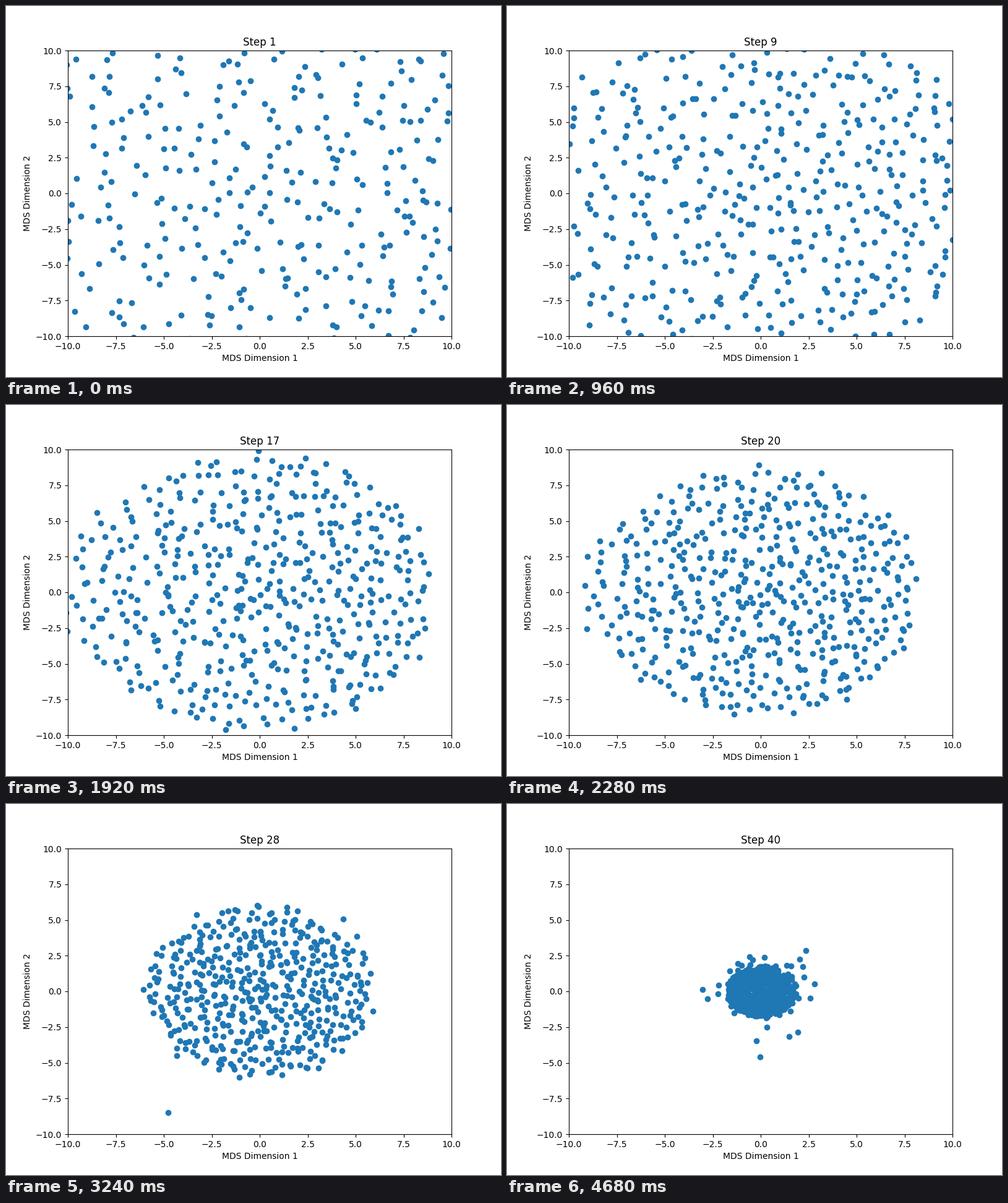
Recreate the animation shown at these times as a matplotlib script. Size 800x600 px, loop 4.8 s.

```python
import numpy as np
import matplotlib.pyplot as plt
from matplotlib.animation import FuncAnimation

STEPS, N = 40, 500
rng = np.random.default_rng(7)

# Evenly spread disk: golden-angle spiral plus jitter
radius = ((np.arange(N) + 0.5) / N) ** 0.54
angle = np.arange(N) * np.pi * (3 - np.sqrt(5))
outward = np.column_stack([np.cos(angle), np.sin(angle)])
disk = radius[:, None] * outward + rng.normal(0, 0.022, (N, 2))

# Slow drift of each dot, and a few dots that trail outside the shrinking disk
speed = rng.uniform(0.1, 0.35, (N, 2))
phase = rng.uniform(0, 2 * np.pi, (N, 2))
spill = np.minimum(0.02 * rng.exponential(1, N) ** 3, 2)


def stray(i):
    """The dot that lags far behind the rest."""
    r = np.interp(i, [0, 23, 31, 39], [22, 11, 8.5, 4.6])
    a = np.radians(np.interp(i, [23, 31, 39], [215.6, 265.6, 269.6]))
    return r * np.cos(a), r * np.sin(a)


def cloud(i):
    unit = disk + 0.022 * np.sin(speed * i + phase)
    unit += rng.normal(0, 0.008, (N, 2))
    # Denser towards the right until the cloud gets small
    skew = 0.12 * np.clip((28 - i) / 14, 0, 1)
    unit[:, 0] += skew * (0.25 - unit[:, 0] ** 2)
    late = np.clip((i - 18) / 21, 0, 1)
    xy = unit * (15.3 - 0.347 * i) + late * spill[:, None] * outward
    xy[-1] = stray(i)
    return xy


path = [cloud(i) for i in range(STEPS)]

fig, ax = plt.subplots(figsize=(8, 6), dpi=100)
ax.set(xlim=(-10, 10), ylim=(-10, 10),
       xlabel="MDS Dimension 1", ylabel="MDS Dimension 2")
dots = ax.scatter(*path[0].T, color="tab:blue")
title = ax.set_title("Step 1")


def update(i):
    dots.set_offsets(path[i])
    title.set_text(f"Step {i + 1}")
    return dots, title


anim = FuncAnimation(fig, update, frames=STEPS, interval=120, repeat=True,
                     repeat_delay=0)
plt.show()
```
